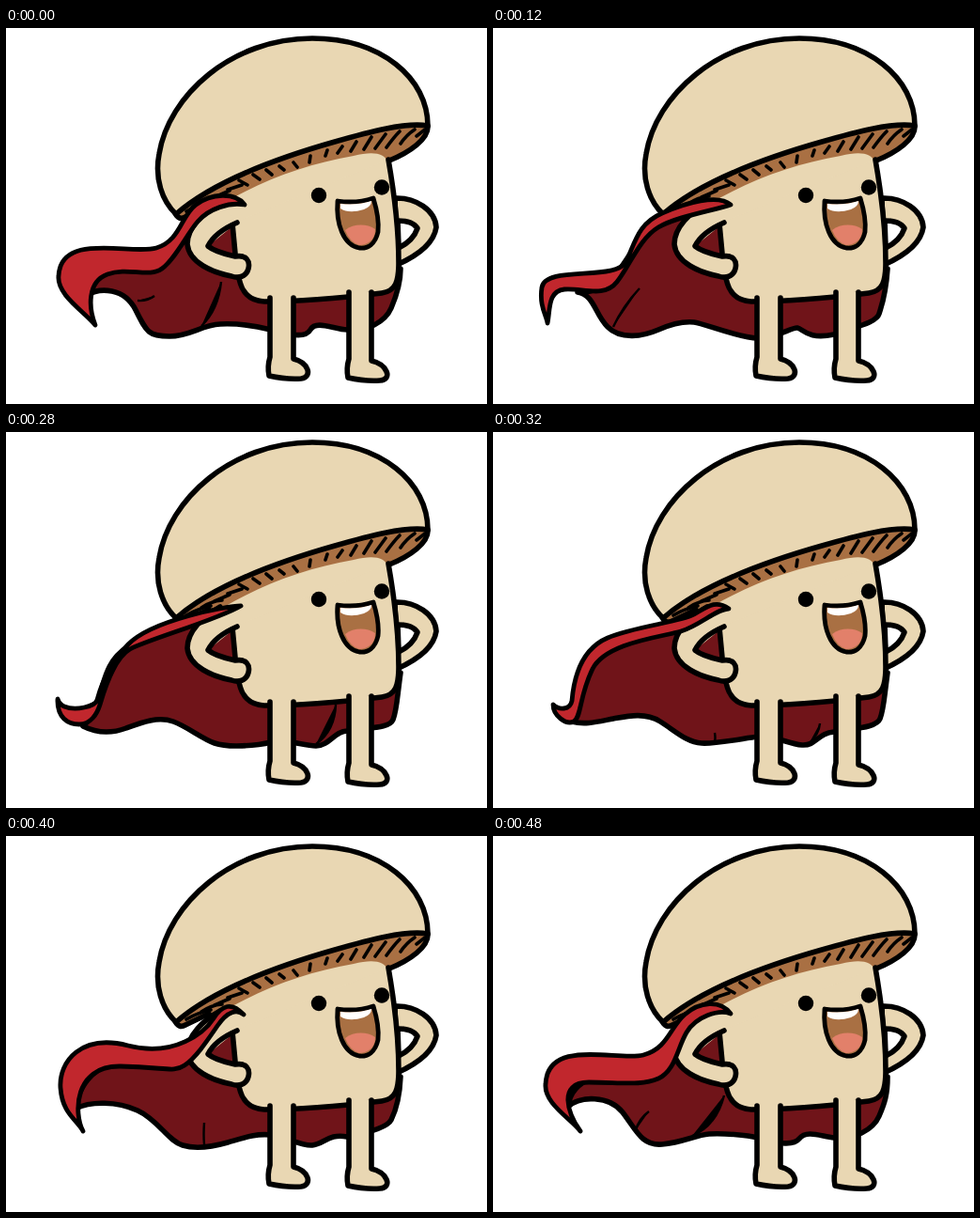
Write an HTML page without scripts that moves like this. It is 512 by 400 pixels and loops after 520 ms.

```html
<!DOCTYPE html>
<html lang="en">
<head>
<meta charset="utf-8">
<title>Caped mushroom</title>
<style>
html, body { margin: 0; height: 100%; overflow: hidden; background: #fff; }
svg { display: block; width: 100vw; height: 100vh; }
path { stroke: #000; stroke-width: 5.6; stroke-linecap: round; stroke-linejoin: round; }
.skin { fill: #e9d7b3; }
.brown { fill: #a97043; }
.line { fill: none; }
.bare { stroke: none; }

/* Poses blend in 40 ms steps; two steps per pose unless a keyframe says otherwise. */
.lining, .fold, .crease, .knot { animation: 520ms steps(2) infinite; }
.lining { fill: #701419; animation-name: lining; }
.fold { fill: #c1272d; stroke-width: 4.8; animation-name: fold; }
.crease { fill: #000; stroke-width: 2.4; stroke-linecap: butt; animation-name: crease; }
.knot { animation-name: knot; animation-timing-function: step-end; }

@keyframes lining {
  0%, 100% { animation-timing-function: steps(3);
    d: path("M236 204C205 200 195 222 178 240S84 246 86 284C100 276 126 276 138 300S152 328 174 328S208 316 228 315S270 318 282 321S318 332 324 321S350 321 363 321C384 324 404 312 410 298S420 270 420 256Z"); }
  23.076% { d: path("M236 204C205 196 180 202 160 222S130 284 90 281C108 284 108 304 122 318S160 328 176 321S204 312 214 313S262 330 282 330S318 318 324 319S335 332 363 326C384 318 408 314 411 304S418 285 420 256Z"); }
  38.461% { d: path("M236 204C200 196 175 204 152 216S124 266 94 303C100 316 112 324 130 324S160 312 178 310S208 315 218 322S264 333 282 331S314 312 324 322S350 332 363 325C384 316 406 312 411 308S416 285 420 256Z"); }
  53.846% { animation-timing-function: step-end;
    d: path("M236 204C195 197 165 206 130 228S108 290 82 313C98 321 112 321 128 315S162 302 178 308S208 326 222 331S266 334 282 330S316 334 330 334S350 318 363 318C384 314 408 316 412 306S416 285 420 256Z"); }
  61.538% { animation-timing-function: step-end;
    d: path("M236 204C205 210 175 214 140 220S96 262 84 308C98 312 112 308 128 305S162 298 178 308S206 330 222 331S266 326 282 324S314 332 329 333S346 320 363 319C384 315 408 315 412 305S416 285 420 256Z"); }
  69.23% { animation-timing-function: step-end;
    d: path("M236 206C215 215 200 222 180 222S80 215 84 302C100 300 112 296 130 296S166 298 178 310S205 332 222 331S266 316 282 318S312 330 328 331S342 320 363 320C384 316 408 314 411 304S416 285 420 256Z"); }
  76.923% { d: path("M236 206C215 215 205 228 190 232S84 220 74 290C90 282 118 282 140 292S172 324 188 329S222 330 236 326S266 316 282 318S314 330 326 329S344 316 363 320C384 316 406 310 410 302S419 280 420 256Z"); }
  92.307% { animation-timing-function: step-end;
    d: path("M236 206C212 205 200 230 184 242S84 240 80 288C92 276 124 276 138 294S158 330 180 328S216 318 230 317S270 318 282 321S318 332 326 322S350 320 363 321C384 324 405 312 411 298S420 275 420 256Z"); }
}
@keyframes fold {
  0%, 100% { animation-timing-function: steps(3);
    d: path("M254 188C244 174 218 176 202 188S186 226 160 234S58 216 56 264C54 284 84 302 95 316C88 298 86 270 108 262S152 266 166 256S192 220 204 206S238 185 254 188Z"); }
  23.076% { d: path("M253 188C240 176 205 186 180 197S152 226 142 248S56 252 52 276C49 296 57 306 58 314C61 300 58 280 76 278S118 288 132 270S156 224 176 212S236 194 253 188Z"); }
  38.461% { d: path("M253 188C240 176 178 198 150 214S116 266 104 277S52 264 42 280C36 290 41 294 43 296C46 290 48 287 54 291S92 312 106 287S132 232 154 219S236 195 253 188Z"); }
  53.846% { animation-timing-function: step-end;
    d: path("M250 185C235 185 155 200 130 226S99 278 97 285S74 297 62 292C57 290 55 284 55 284C54 304 66 311 78 311S97 300 100 290S114 241 132 231S225 200 250 185Z"); }
  61.538% { animation-timing-function: step-end;
    d: path("M251 188C237 178 228 186 214 194S150 207 122 219S86 262 84 286C82 296 70 296 64 290C64 302 78 312 86 308S92 280 106 252S180 218 200 212S238 188 251 188Z"); }
  69.23% { animation-timing-function: step-end;
    d: path("M252 190C240 176 232 180 222 195S170 210 130 211S72 235 73 265C74 295 82 298 78 307C84 300 82 232 122 230S180 234 194 232S220 214 228 202S246 186 252 190Z"); }
  76.923% { d: path("M253 190C240 176 230 180 221 194S180 236 130 223S56 240 58 268C60 296 76 302 82 314C72 296 72 244 122 245S178 252 190 244S214 218 225 202S246 184 253 190Z"); }
  92.307% { animation-timing-function: step-end;
    d: path("M253 189C242 174 220 176 204 190S186 226 160 233S58 214 56 264C54 284 82 300 93 314C80 296 68 262 102 262S158 266 176 258S196 226 206 209S240 184 253 189Z"); }
}
@keyframes crease {
  0%, 100% { animation-timing-function: steps(3);
    d: path("M158 285Q150 291 140 290M229 270Q226 300 208 317"); }
  23.076% { d: path("M156 277Q138 296 128 318M212 313Q212 313 212 313"); }
  38.461% { d: path("M128 324Q128 324 128 324M340 331Q340 331 340 331"); }
  53.846% { animation-timing-function: step-end;
    d: path("M236 331Q236 331 236 331M351 290Q350 318 330 332"); }
  61.538% { animation-timing-function: step-end;
    d: path("M236 320Q237 326 236 329M348 310Q347 322 336 332"); }
  69.23% { animation-timing-function: step-end;
    d: path("M236 310Q238 320 237 329M345 330Q345 330 345 330"); }
  76.923% { d: path("M211 305Q210 318 211 328M236 326Q236 326 236 326"); }
  92.307% { animation-timing-function: step-end;
    d: path("M166 293Q155 301 152 313M246 276Q238 308 212 319"); }
}
@keyframes knot {
  0%, 76.923% { opacity: 0; }
  69.23% { opacity: 1; }
}
</style>
</head>
<body>
<svg viewBox="0 0 512 400">
  <path class="lining"/>
  <path class="crease"/>

  <!-- far arm -->
  <path class="skin" d="M414 181C436 180 457 194 458 212C455 232 434 244 416 252Z"/>
  <path fill="#fff" d="M417 205C427 205 435 208 438 213C435 222 428 229 418 234Z"/>

  <!-- gills and body -->
  <path class="brown bare" d="M182 198C250 150 340 112 449 104C450 118 430 132 408 141L370 140C320 149 280 162 240 186Q215 190 187 203Z"/>
  <path class="line" d="M449 104C450 118 430 132 408 141M180 197Q184 205 191 201L216 189"/>
  <path class="skin bare" d="M241 212L232 186C280 159 320 145 370 136C390 131 403 133 406 142V200Z"/>
  <path class="skin" d="M407 140C414 180 418 220 418 250C418 269 415 280 400 282C350 288 310 291 275 291C250 290 247 270 244 240L241 208"/>

  <!-- legs -->
  <path class="skin" d="M281 287V350Q278 360 280 370Q298 374 314 373C327 371 322 356 306 352V287"/>
  <path class="skin" d="M365 281V352Q362 362 364 372Q382 376 398 375C412 374 406 358 389 354V281"/>

  <!-- face -->
  <circle cx="333" cy="178" r="8.200"/>
  <circle cx="400" cy="169.500" r="8.200"/>
  <path class="brown" style="stroke-width:4.800" d="M353 184Q373 187 391 181C395 194 397 208 396 217C393 230 385 235 376 234C359 231 351 208 353 184Z"/>
  <path class="bare" fill="#fff" d="M356 187Q374 189 389 184Q389 190 381 193Q365 198 356 192Z"/>
  <path class="bare" fill="#e2806a" d="M361 215C370 208 384 208 393 214C393 226 384 231 376 231Q366 228 361 215Z"/>

  <!-- near arm -->
  <path class="skin bare" d="M228 186L252 190L246 207L215 232L200 206Z"/>
  <path class="skin" d="M246 207C232 213 220 222 215 232C222 238 235 241 244 243C256 241 260 248 258 256C256 264 248 267 240 264C220 260 195 250 193 230C193 212 210 196 228 186"/>

  <!-- cap -->
  <path class="skin" d="M181 198C166 184 158 160 163 134C173 72 240 11 326 11C400 11 449 54 449 104C425 100 385 111 350 121C290 138 222 162 181 198Z"/>
  <path class="line" style="stroke-width:3.600" d="M192 195Q204 188 218 185M208 187Q218 180 230 179M222 180L238 173M236 172L251 167M248 162L257 167M263 156L270 161M277 151L283 156M291 147L296 151M306 143L310 148M324 136L323 143M342 130L340 136M358 126L353 133M373 121L367 131M389 116L381 129M404 113L393 128M419 110Q413 116 405 127M435 108Q426 114 420 123M446 108L437 115"/>

  <path class="fold"/>
  <g class="knot">
    <circle cx="77" cy="307" r="8"/>
    <circle cx="78" cy="309" r="1.500" fill="#701419"/>
  </g>
</svg>
</body>
</html>
```
